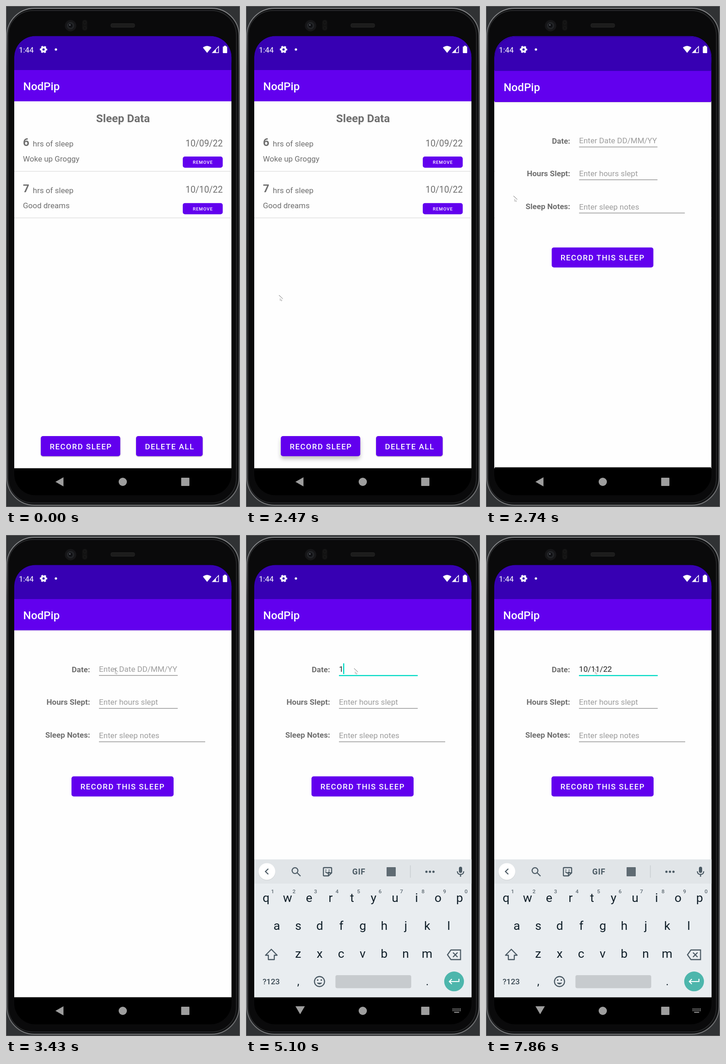
Recreate the animation shown at these times as an HTML page. Size 511 by 1095 pixels, loop 8 s.

```html
<!DOCTYPE html>
<html lang="en">
<head>
<meta charset="utf-8">
<title>Sleep tracker</title>
<style>
  html, body { margin: 0; width: 511px; height: 1095px; overflow: hidden; background: #303234; }
  svg { display: block; font-family: Roboto, "Open Sans", sans-serif; }
  .b { font-weight: 700; }
  .m { font-weight: 500; }
  .btn { letter-spacing: .0893em; font-weight: 500; }
  .gif { letter-spacing: .04em; font-weight: 700; }
  .icon { fill: none; stroke: #4b5a64; stroke-width: 2.3; }
  #record { filter: drop-shadow(0 1px 1px rgba(0,0,0,.3)); }
  #record.up { filter: drop-shadow(0 6px 4px rgba(0,0,0,.24)); }
  .low { filter: drop-shadow(0 1px 1px rgba(0,0,0,.3)); }
</style>
</head>
<body>
<svg id="stage" width="511" height="1095" viewBox="0 0 511 1095" xmlns="http://www.w3.org/2000/svg"></svg>
<script>
const LOOP = 8000, PURPLE = '#6200ee', TEAL = '#03dac5', GREY = '#6f6f6f', HINT = '#9d9d9d';

const rect = (x, y, w, h, fill, rx = 0, extra = '') =>
  `<rect x="${x}" y="${y}" width="${w}" height="${h}" rx="${rx}" fill="${fill}" ${extra}/>`;
const circle = (x, y, r, fill, extra = '') => `<circle cx="${x}" cy="${y}" r="${r}" fill="${fill}" ${extra}/>`;
const path = (d, extra = '') => `<path d="${d}" ${extra}/>`;
const text = (s, x, y, size, fill, cls = '', anchor = 'start') =>
  `<text x="${x}" y="${y}" font-size="${size}" fill="${fill}" class="${cls}" text-anchor="${anchor}">${s}</text>`;
const group = (inner, attrs = '') => `<g ${attrs}>${inner}</g>`;

const button = (s, x, y, w, h, tx, ty, size, attrs = '') =>
  group(rect(x, y, w, h, PURPLE, 4.8) + text(s, tx, ty, size, '#fff', 'btn'), attrs);

function phone() {
  return `<defs>
    <linearGradient id="rim" x1="0" y1="0" x2="0" y2="1">
      <stop offset="0" stop-color="#8c8d8f"/><stop offset=".12" stop-color="#4a4b4d"/>
      <stop offset=".5" stop-color="#2b2c2e"/><stop offset=".8" stop-color="#55565a"/>
      <stop offset="1" stop-color="#77787a"/>
    </linearGradient>
    <clipPath id="glass">${rect(18, 65.5, 474.5, 1004, '#000', 46)}</clipPath></defs>` +
    rect(0, 0, 511, 1095, '#303234') +
    rect(.5, .5, 510, 1094, 'none', 0, 'stroke="#6d6e70"') +
    rect(2, 5, 507, 1086, '#111213', 60, 'stroke="url(#rim)" stroke-width="2"') +
    rect(5, 10, 498, 1076, '#0a0a0b', 54, 'stroke="#2c2d2f" stroke-width="1.5"') +
    circle(141, 43, 12.5, '#161618') + circle(141, 43, 8, '#222427') +
    circle(141, 43, 4.5, '#101114') + circle(139.5, 41.5, 1.3, '#7d7f8a') +
    rect(166.5, 30, 11, 24, '#121212', 5) +
    circle(172, 36, 3.5, 'none', 'stroke="#1c1c1c"') + circle(172, 48, 3.5, 'none', 'stroke="#1c1c1c"') +
    rect(229, 38.5, 52, 8, '#1c1c1c', 3, 'stroke="#262626"');
}

const page = inner =>
  rect(18, 65.5, 474.5, 1004, '#000', 46) +
  rect(18, 65.5, 474.5, 100, '#3700b3', 46) +
  rect(18, 111, 474.5, 30, '#3700b3') +
  rect(18, 208, 474.5, 802.3, '#fefefe') +
  rect(18, 140, 474.5, 68.3, PURPLE) +
  text('NodPip', 37.5, 184, 24.2, '#fff', 'm') + inner;

const entry = (y, hours, note, date) =>
  text(hours, 37, y + 25.5, 24.2, GREY, 'b') +
  text('hrs of sleep', 58.5, y + 27, 17.1, GREY) +
  text(note, 37, y + 60.2, 17, GREY) +
  text(date, 473.3, y + 26.7, 19.35, GREY, '', 'end') +
  button('REMOVE', 386, y + 49, 87.3, 24.5, 408, y + 65, 9.75) +
  rect(18, y + 80.7, 474.5, 1.4, '#dfdfdf');

const list = () => page(
  text('Sleep Data', 255.5, 253.5, 24.3, GREY, 'b', 'middle') +
  entry(280, 6, 'Woke up Groggy', '10/09/22') +
  entry(381.7, 7, 'Good dreams', '10/10/22') +
  button('RECORD SLEEP', 76, 940, 173.5, 44, 95.4, 969, 16.93, 'id="record"') +
  button('DELETE ALL', 284, 940, 145.5, 44, 303.4, 969, 16.93, 'class="low"'));

const field = (label, hint, labelY, hintY, w, id = '') =>
  text(label, 183.6, labelY, 17.1, GREY, 'b', 'end') +
  group(text(hint, 203, hintY, 17.15, HINT), id && `id="${id}Hint"`) +
  rect(203, hintY + 7.3, w, 1.3, '#888');

const form = () => page(
  rect(18, 208.3, 474.5, 1.2, '#000', 0, 'opacity=".1"') +
  field('Date:', 'Enter Date DD/MM/YY', 299.5, 299, 172, 'date') +
  field('Hours Slept:', 'Enter hours slept', 371, 371, 172) +
  field('Sleep Notes:', 'Enter sleep notes', 443, 444, 232) +
  group(rect(203, 306, 172, 2.4, TEAL), 'id="focus"') +
  `<text id="typed" x="203" y="299" font-size="17.15" fill="#212121"></text>` +
  rect(0, 280.5, 2.5, 23.5, TEAL, 0, 'id="caret"') +
  button('RECORD THIS SLEEP', 143, 527.5, 223, 44, 162.4, 556, 16.93));

const status = () =>
  text('1:44', 28, 101.7, 16.9, '#fff') +
  circle(82, 95, 4.5, 'none', 'stroke="#fff" stroke-width="4"') +
  circle(82, 95, 7, 'none', 'stroke="#fff" stroke-width="2.2" stroke-dasharray="3.9 3.43" stroke-dashoffset="1.9"') +
  circle(109, 95, 2.6, '#fff') +
  path('M430 91Q439 83.500 448.500 91L439.200 102.500Z', 'fill="#fff"') +
  path('M464.300 88.500V102H451Z', 'fill="none" stroke="#fff" stroke-width="1.400"') +
  path('M458.500 94.500V102H451Z', 'fill="#fff"') +
  rect(473.5, 88.5, 9.5, 14.5, '#fff', 1.3) + rect(476.2, 86.8, 4.2, 3, '#fff');

function nav() {
  const dots = [0, 1, 2, 3, 4, 5].map(i => rect(451 + i * 3.2, 1035, 2, 2, '#9e9e9e') +
    rect(451 + i * 3.2, 1038.5, 2, 2, '#9e9e9e')).join('');
  return group(
    path('M108 1040L125.500 1030V1050Z', 'id="back"') +
    path('M108 1030H128.500L118.200 1047.500Z', 'id="hide"') +
    circle(255, 1040, 9, '#9e9e9e') + rect(382.5, 1031, 18, 18, '#9e9e9e', 1) +
    group(dots + rect(454.5, 1042.3, 11, 2, '#9e9e9e'), 'id="imeIcon"'),
    'fill="#9e9e9e"');
}

function keyboard() {
  const INK = '#101f29', ICON = '#4b5a64', STEP = 46.95;
  const row = (letters, x, y) => [...letters].map((c, i) =>
    text(c, x + i * STEP, y, 26.6, INK, '', 'middle')).join('');
  const digits = [...'1234567890'].map((c, i) =>
    text(c, 58 + i * STEP, 783, 11.8, '#5f6b73', 'm', 'middle')).join('');
  const tools =
    circle(107, 733.5, 6.3, 'none', 'class="icon"') + path('M111.500 738L119 745.500', 'class="icon"') +
    path('M170.500 727H185.500Q187 727 187 728.500V738.500L180 745H170.500Q169 745 169 743.500V728.500Q169 727 170.500 727ZM180 745V738.500H187M173.500 735.500Q177.500 742 182 735.500', 'class="icon" stroke-width="2"') +
    circle(174.5, 732.5, 1.3, ICON) + circle(181.5, 732.5, 1.3, ICON) +
    text('GIF', 246.4, 742, 17.6, ICON, 'gif', 'middle') +
    rect(307, 726, 20, 20, '#5f6b73', 1) +
    rect(358.3, 722, 1.3, 27, '#c5cacd') +
    [394, 401.7, 409.4].map(x => circle(x, 736, 2.5, ICON)).join('');
  const words =
    [['to', 123.5], ['I', 253.7], ['the', 383.3]].map(([s, x]) => text(s, x, 743.5, 20.3, '#505c64', '', 'middle')).join('') +
    rect(185, 721, 1.3, 29, '#c5cacd') + rect(322.5, 721, 1.3, 29, '#c5cacd');
  return rect(18, 709, 474.5, 301.3, '#e9edf0') + rect(18, 709, 474.5, 53, '#e1e5e8') +
    circle(45.7, 736.3, 18.5, '#c9cdd0') + circle(45.7, 735.5, 18.3, '#fff') +
    group(path('M48.700 729.500L42.500 735.500L48.700 741.500', 'class="icon" stroke="#333"'), 'id="chevron"') +
    group(tools, 'id="tools"') + group(words, 'id="words"') +
    rect(465, 725, 7, 13.5, ICON, 3.5) +
    path('M461.500 735Q462 742 468.500 742T475.500 735M468.500 742V747', 'class="icon" stroke-width="2"') +
    row('qwertyuiop', 43.8, 802) + digits + row('asdfghjkl', 67.2, 863) + row('zxcvbnm', 113.8, 924) +
    path('M55.300 905.500L68 918.500H61.800V928H48.800V918.500H42.600Z', 'class="icon" stroke-linejoin="round"') +
    path('M440 917.500L447.500 907H468.500V928H447.500ZM452 912.500L462 922.500M462 912.500L452 922.500', 'class="icon"') +
    text('?123', 55, 982, 17.2, '#3c4a54', 'm', 'middle') +
    text(',', 114, 983.5, 24, INK, '', 'middle') + text('.', 396, 983.5, 24, INK, '', 'middle') +
    circle(160.5, 976, 11, 'none', 'class="icon"') +
    circle(156.5, 972.8, 1.8, ICON) + circle(164.5, 972.8, 1.8, ICON) +
    path('M154.500 978.500Q160.500 986 166.500 978.500Z', `fill="${ICON}"`) +
    rect(195.3, 962, 165.5, 28.5, '#c7cbce', 4) +
    circle(454.4, 975.7, 21.6, '#4db6ac') +
    path('M465 970V976H444.500M449.500 970.500L444 976L449.500 981.500', 'fill="none" stroke="#fff" stroke-width="2.200"');
}

const pointer = () =>
  path('M-4 -6.500L4.300 1.500', 'stroke="#555" stroke-width=".9"') +
  path('M-1.800 1L3 5L.8 5L1.800 7M-1.800 1L-1.500 5.500L.3 4.500', 'fill="#fff" stroke="#999" stroke-width=".7"');

const $ = id => document.getElementById(id);
$('stage').innerHTML = phone() + group(
  group(list()) + group(form(), 'id="form"') + status() + nav() + group(keyboard(), 'id="ime"'),
  'clip-path="url(#glass)"') + group(pointer(), 'id="pointer"');

// Each track is a list of [start time, ...values], held until the next entry.
const tracks = {
  pointer: [[0, -50, -50], [960, 32, 817], [1100, 45, 842], [1230, 68, 878], [1370, 98, 914],
    [1510, 131, 943], [1640, 155, 960], [1780, 167, 967], [2340, 116, 810], [2470, 76, 638.5],
    [2590, 64, 515], [2740, 64, 421.5], [2870, 105, 378], [3000, 178, 347], [3130, 226, 331],
    [3280, 236, 309], [3420, 240, 298]],
  raised: [[0, 0], [2340, 1]],
  scale: [[0, 0], [2590, .962], [2740, .9955], [2870, .999], [3000, 1]],
  focus: [[0, 0], [3560, 1]],
  caret: [[0, 0], [3700, 1], [4160, 0], [4570, 1], [7860, 0]],
  ime: [[0, 0, 36], [4010, .7, 36], [4160, 1, 0]],
  chars: [[0, 0], [5100, 1], [5390, 2], [5670, 3], [6390, 4], [6510, 5], [6630, 6], [7010, 7], [7360, 8]],
  words: [[0, 0], [5670, .5], [5810, 1], [6390, 0], [6630, 1], [7010, .5], [7160, 0]]
};
const at = (name, t) => tracks[name].findLast(k => k[0] <= t).slice(1);
const show = (id, on) => $(id).setAttribute('opacity', +on);
const move = (id, value) => $(id).setAttribute('transform', value);

function draw(t) {
  const [s] = at('scale', t), [alpha, dy] = at('ime', t), [words] = at('words', t);
  const typed = '10/11/22'.slice(0, at('chars', t)[0]);
  move('pointer', `translate(${at('pointer', t)})`);
  $('record').classList.toggle('up', !!at('raised', t)[0]);
  show('form', s > 0);
  move('form', `translate(255.5 567.5) scale(${s || 1}) translate(-255.5 -567.5)`);
  show('focus', at('focus', t)[0]);
  show('dateHint', !typed);
  $('typed').textContent = typed;
  $('caret').setAttribute('x', 203.2 + (typed ? $('typed').getComputedTextLength() - .8 : 0));
  show('caret', at('caret', t)[0]);
  show('ime', alpha);
  move('ime', `translate(0 ${dy})`);
  show('back', !alpha);
  show('hide', alpha > 0);
  show('imeIcon', alpha > 0);
  show('tools', 1 - words);
  show('words', words);
  move('chevron', `rotate(${180 * words} 45.7 735.5)`);
}

const start = performance.now();
function tick() {
  draw((performance.now() - start) % LOOP);
  requestAnimationFrame(tick);
}
tick();
</script>
</body>
</html>
```
